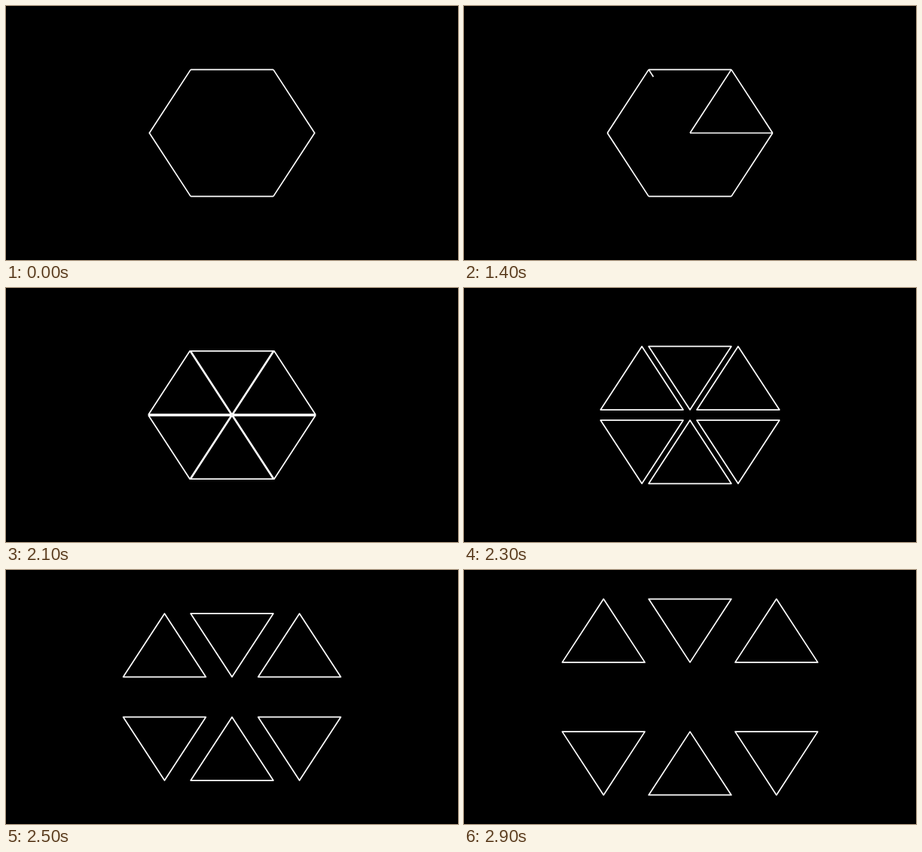
An HTML page with a canvas for the animation above (3 s loop, 600 by 338 pixels).

```html
<!DOCTYPE html>
<html lang="en">
<head>
<meta charset="utf-8">
<title>Hexagon to triangles</title>
<style>
  html, body { margin: 0; width: 100%; height: 100%; overflow: hidden; background: #000; }
  canvas { display: block; width: 600px; height: 338px; }
</style>
</head>
<body>
<canvas id="stage" width="600" height="338"></canvas>
<script>
const ctx = document.getElementById("stage").getContext("2d");
const LOOP = 3000, STEP = 100, LEAD = 30;
const UNIT = 600 * 9 / 128;   // pixels per scene unit
const HALF = 1.3, RISE = 2, SPREAD = 1.1;
const CENTER = [0, 0];

// Corners counter-clockwise from the right, y pointing up.
const corners = [
  [2 * HALF, 0], [HALF, RISE], [-HALF, RISE],
  [-2 * HALF, 0], [-HALF, -RISE], [HALF, -RISE]
];
const corner = i => corners[i % 6];

const sigmoid = x => 1 / (1 + Math.exp(-x));
function smooth(t) {
  const edge = sigmoid(-5);
  const x = Math.min(1, Math.max(0, t));
  return (sigmoid(10 * (x - 0.5)) - edge) / (1 - 2 * edge);
}

const mix = (a, b, k) => [a[0] + (b[0] - a[0]) * k, a[1] + (b[1] - a[1]) * k];

function stroke(points, closed = false) {
  ctx.beginPath();
  for (const [x, y] of points) ctx.lineTo(300 + x * UNIT, 169 - y * UNIT);
  if (closed) ctx.closePath();
  ctx.stroke();
}

function drawOutline(joined) {
  ctx.lineJoin = "miter";
  if (joined) {
    stroke([corner(5), corner(0), corner(1)]);
    stroke([corner(1), corner(2)]);
    stroke([corner(2), corner(3), corner(4)]);
    stroke([corner(4), corner(5)]);
  } else {
    corners.forEach((c, i) => stroke([c, corner(i + 1)]));
  }
}

// Spokes grow inward one after another, 100 ms each.
function drawSpokes(ms) {
  corners.forEach((c, i) => {
    const k = smooth((ms - i * 100) / 100);
    if (k > 0) stroke([c, mix(c, CENTER, k)]);
  });
}

function drawTriangles(k) {
  ctx.lineJoin = "round";
  corners.forEach((a, i) => {
    const b = corner(i + 1);
    const dx = Math.sign(Math.round(a[0] + b[0])) * HALF * SPREAD * k;
    const dy = Math.sign(a[1] + b[1]) * SPREAD * k;
    stroke([CENTER, a, b].map(([x, y]) => [x + dx, y + dy]), true);
  });
}

function draw(ms) {
  ctx.fillStyle = "#000";
  ctx.fillRect(0, 0, 600, 338);
  ctx.strokeStyle = "#fff";
  ctx.lineWidth = 0.04 * UNIT;
  ctx.lineCap = "butt";
  if (ms < 2000) {
    drawOutline(ms < 1000);
    drawSpokes(ms - 1200);
  } else {
    drawTriangles(smooth((ms - 2000) / 1000));
  }
}

// The picture advances in steps of 100 ms.
const start = performance.now();
function tick() {
  const ms = (performance.now() - start) % LOOP;
  draw(Math.floor(ms / STEP) * STEP + LEAD);
  requestAnimationFrame(tick);
}
tick();
</script>
</body>
</html>
```
